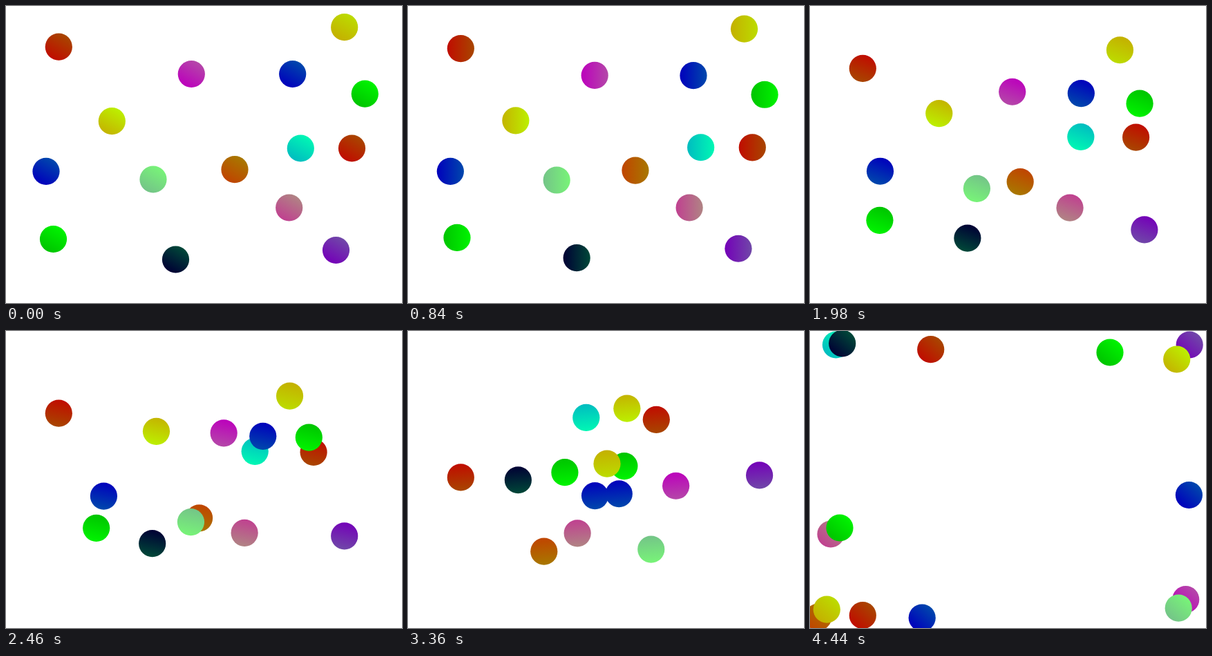
Animation of 573 by 430 pixels, one loop 4500 ms. Source, as an HTML page with a canvas:

```html
<!DOCTYPE html>
<html lang="en">
<head>
<meta charset="utf-8">
<title>Drifting balls</title>
<style>
  html, body { margin: 0; width: 100%; height: 100%; overflow: hidden; background: #fff; }
  canvas { display: block; }
</style>
</head>
<body>
<canvas id="stage" width="573" height="430"></canvas>
<script>
const ctx = document.getElementById('stage').getContext('2d');
const LOOP = 4500, STEP = 60, TRAVEL = 4440, RADIUS = 19.6;

// Shade pairs: dark side, light side
const shades = {
  red: ['#c00c00', '#a84600'],
  yellow: ['#c4b400', '#bcf000'],
  gold: ['#c4b000', '#bcdc00'],
  magenta: ['#bc00bc', '#b448a8'],
  blue: ['#0000bc', '#0048ac'],
  green: ['#00c400', '#00f400'],
  cyan: ['#00bcc0', '#00f8b4'],
  pink: ['#c04090', '#b08484'],
  purple: ['#7400b8', '#7048a8'],
  dark: ['#000034', '#004838'],
  mint: ['#74c488', '#78f478'],
  orange: ['#c04400', '#a87800']
};

// Back to front: shade, then waypoints [progress, x, y]
const line = (shade, x0, y0, x1, y1) => ({ shade, path: [[0, x0, y0], [1, x1, y1]] });
const balls = [
  line('cyan', 426.3, 206, 37.5, 20),
  line('pink', 409.7, 292, 30, 294),
  line('purple', 477.5, 353.5, 549.2, 20),
  line('red', 500.5, 206, 174.7, 26.7),
  line('blue', 414.7, 98.5, 162.2, 415.2),
  { shade: 'orange', path: [[0, 331, 236.7], [.273, 248.4, 291.5], [.647, 128, 356], [1, 12, 414]] },
  line('green', 68.5, 337.5, 434, 31),
  line('blue', 58, 239.4, 548.4, 237.5),
  line('magenta', 268.3, 98.5, 543.7, 388.7),
  line('red', 76.3, 59.2, 76.3, 411.7),
  line('green', 519.3, 127.2, 43, 285),
  line('yellow', 153.3, 166.7, 530.7, 41),
  line('gold', 489.7, 30.7, 24.3, 403.2),
  line('dark', 245.5, 367, 46.7, 18),
  line('mint', 213, 251, 533.2, 401.2)
];

// Direction of the light side: [ms, degrees]
const light = [[0, -60], [840, 0], [1320, 35], [1980, 110], [2880, 95], [3840, 75], [4500, -60]];

// Piecewise linear lookup on rows whose first column is the key
function sample(rows, key) {
  let i = 1;
  while (i < rows.length - 1 && key > rows[i][0]) i++;
  const a = rows[i - 1], b = rows[i];
  const u = (key - a[0]) / (b[0] - a[0]);
  return a.slice(1).map((v, n) => v + (b[n + 1] - v) * u);
}

function drawBall(x, y, [from, to], angle) {
  const dx = Math.cos(angle) * RADIUS, dy = Math.sin(angle) * RADIUS;
  const fill = ctx.createLinearGradient(x - dx, y - dy, x + dx, y + dy);
  fill.addColorStop(0, from);
  fill.addColorStop(1, to);
  ctx.fillStyle = fill;
  ctx.beginPath();
  ctx.arc(x, y, RADIUS, 0, Math.PI * 2);
  ctx.fill();
}

function render() {
  const now = performance.now() % LOOP;
  const t = Math.floor(now / STEP) * STEP;
  const progress = (t / TRAVEL) ** 3;
  const angle = sample(light, t)[0] * Math.PI / 180;
  ctx.fillStyle = '#fff';
  ctx.fillRect(0, 0, 573, 430);
  for (const { shade, path } of balls) {
    const [x, y] = sample(path, progress);
    drawBall(x, y, shades[shade], angle);
  }
  requestAnimationFrame(render);
}
render();
</script>
</body>
</html>
```
